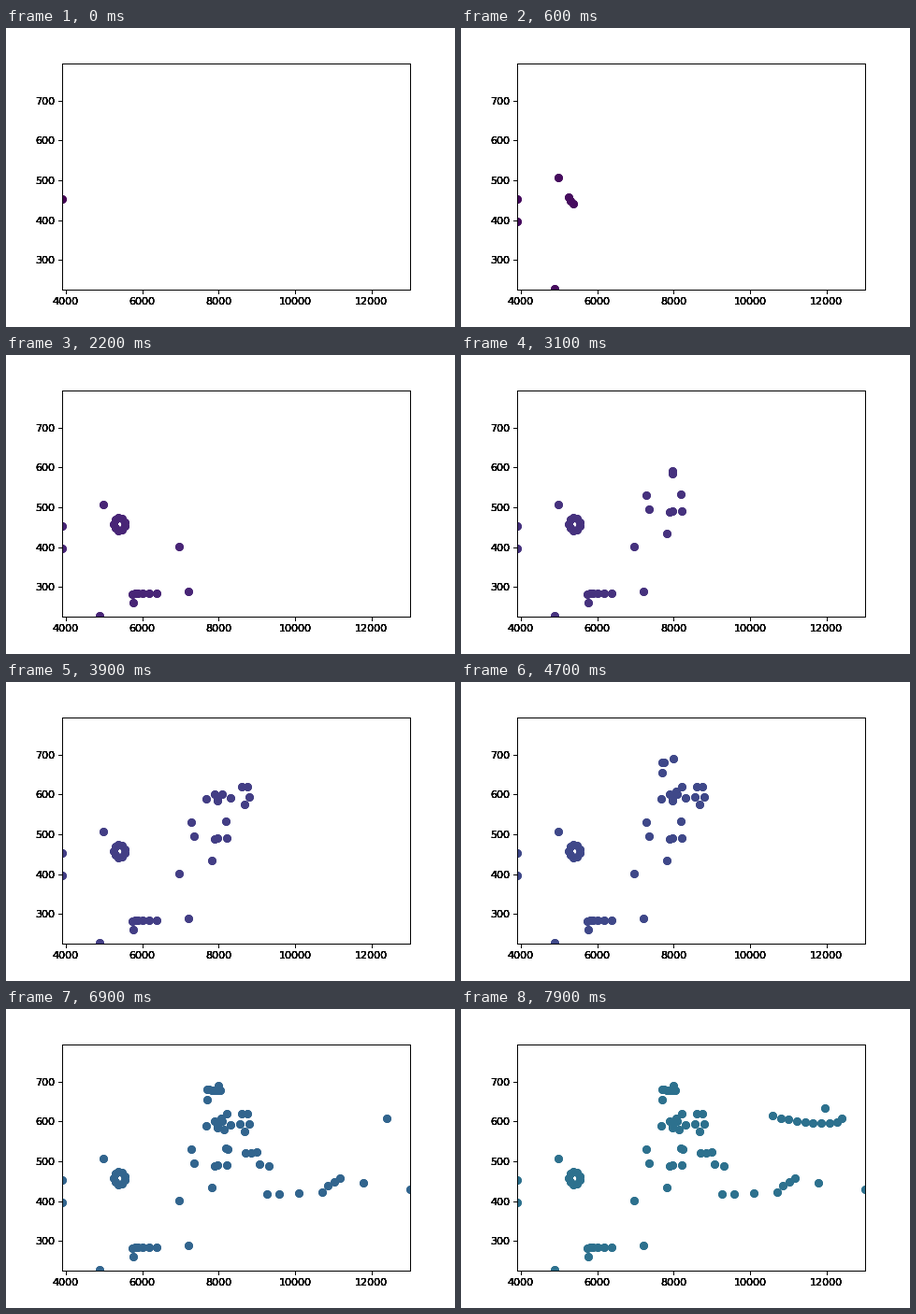
Write a matplotlib script that moves like this. It is 480 by 320 pixels and loops after 8 s.

```python
import matplotlib.pyplot as plt
import numpy as np
from matplotlib.animation import FuncAnimation

COLOR_SPAN = 215   # steps for the full colormap
LAYERS = 7         # stacked axes harden the antialiased edges


def line(a, b, n=2, ease=1, bulge=0):
    """n points from a to b, optionally eased and bowed."""
    t = np.linspace(0, 1, n)[:, None]
    path = np.array(a) + (np.array(b) - np.array(a)) * t ** ease
    path[:, 1] += bulge * np.sin(np.pi * t[:, 0])
    return path


def ring(cx, cy, rx, ry, n, start):
    """n points around an ellipse, counter-clockwise."""
    angle = start + 2 * np.pi * np.arange(n) / n
    return np.column_stack([cx + rx * np.cos(angle), cy + ry * np.sin(angle)])


# Groups in order of arrival
points = np.vstack([
    line((3906, 452), (3906, 396)),
    line((4890, 228), (4985, 506)),
    ring(5408, 458, 150, 16, 9, np.pi),
    line((5764, 260), (5745, 281)),
    line((5805, 284), (6380, 284), 6, ease=2),
    line((7205, 288), (6967, 401)),
    line((7823, 434), (7358, 495)),
    line((7897, 489), (8215, 491), 3, ease=2),
    line((7285, 530), (8190, 532)),
    line((7970, 584), (7970, 591)),
    line((7676, 589), (8313, 591), 4, bulge=13),
    ring(8680, 600, 122, 24, 5, -np.pi / 2),
    line((8215, 619), (7934, 598), 3),
    line((7701, 654), (7994, 689)),
    line((7701, 680), (8044, 678), 7),
    line((8141, 580), (8239, 530)),
    line((8704, 521), (8998, 523), 3),
    line((9316, 488), (9072, 492)),
    line((9267, 417), (10711, 422), 4, ease=1.4),
    line((10858, 440), (11176, 457), 3),
    line((11788, 445), (13008, 429)),
    line((12400, 607), (11959, 633)),
    line((10589, 614), (12277, 598), 9, bulge=-8),
])

fig = plt.figure(figsize=(6, 4), dpi=80, facecolor="white")


def add_layer():
    ax = fig.add_axes([0.125, 0.125, 0.775, 0.755], facecolor="none")
    ax.set(xlim=(3906, 13008), ylim=(225.3, 792.3),
           xticks=range(4000, 13000, 2000), yticks=range(300, 800, 100))
    return ax.scatter([], [], s=36, linewidths=1.5)


layers = [add_layer() for _ in range(LAYERS)]


def update(i):
    color = plt.cm.viridis(i / COLOR_SPAN)
    for dots in layers:
        dots.set_offsets(points[:i + 1])
        dots.set_color(color)
    return layers


anim = FuncAnimation(fig, update, frames=len(points), interval=100,
                     repeat=True, repeat_delay=0)
plt.show()
```
